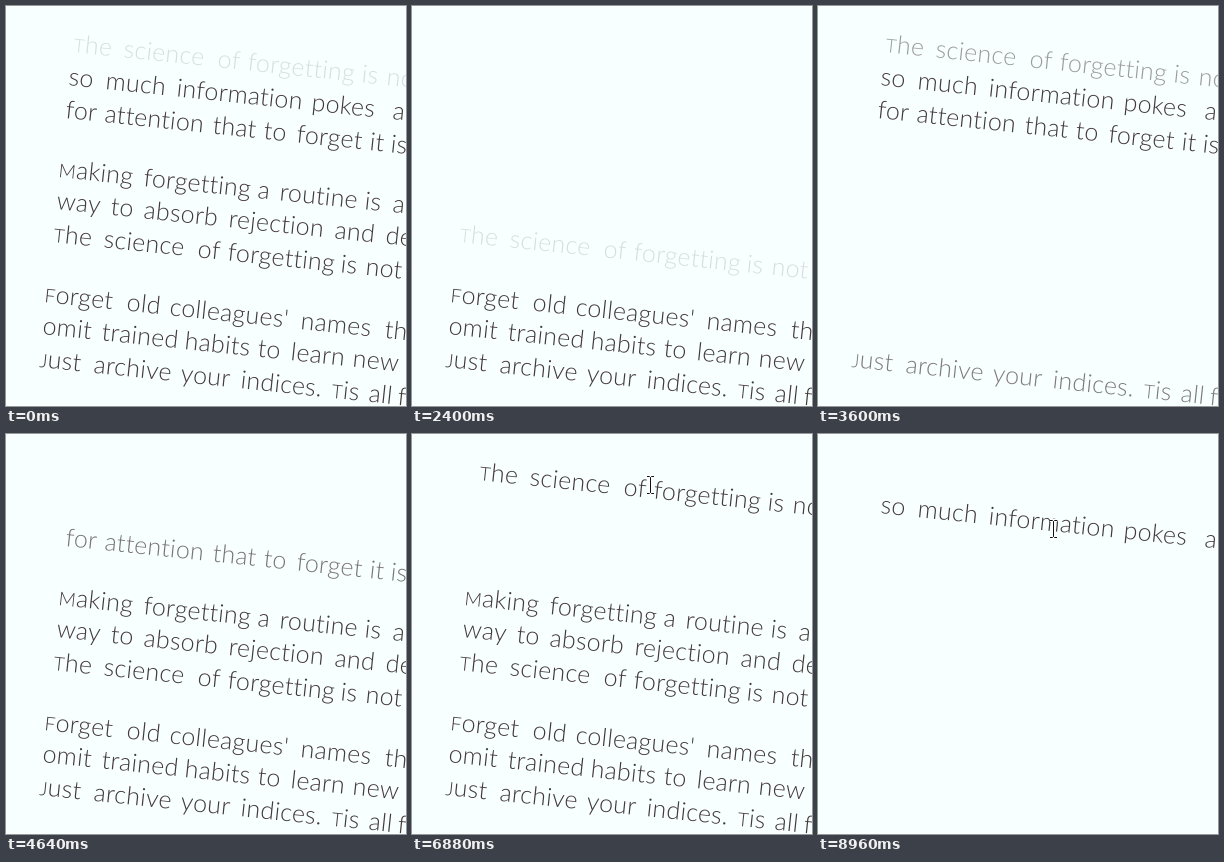
Recreate the animation shown at these times as an HTML page. Size 400 by 400 pixels, loop 9440 ms.

```html
<!DOCTYPE html>
<html lang="en">
<head>
<meta charset="utf-8">
<title>Forgetting</title>
<style>
  html, body { margin: 0; width: 100%; height: 100%; overflow: hidden; background: #f8ffff; }
  svg { display: block; width: 100%; height: 100%; }
  text {
    font: 300 25px Lato, sans-serif; letter-spacing: .25px;
    font-variant-ligatures: none; fill: #43383a;
  }
  .cap { font-size: 19px; }
  #caret path { fill: none; stroke: #fff; stroke-width: 3; }
  #caret path + path { stroke: #111; stroke-width: 1; }
</style>
</head>
<body>
<svg viewBox="0 0 400 400">
  <g id="page"></g>
  <g id="caret"></g>
</svg>
<script>
const LOOP = 9440, STEP = 40, TILT = 6;

// baseline of the first word, then each word after its left edge
const LINES = [
  "46 67 The 117 science 211 of 241 forgetting 355 is 380 not",
  "79 62 so 99 much 170 information 305 pokes 386 a",
  "112 59 for 98 attention 206 that 257 to 290 forget 363 it 384 is",
  "171 52 Making 137 forgetting 251 a 273 routine 358 is 386 a",
  "203 50 way 104 to 137 absorb 222 rejection 328 and 379 defeat",
  "236 47 The 97 science 191 of 221 forgetting 334 is 359 not",
  "296 38 Forget 120 old 163 colleagues' 294 names 378 that",
  "328 36 omit 95 trained 178 habits 251 to 284 learn 346 new",
  "361 33 Just 87 archive 174 your 234 indices. 325 Tis 362 all 391 for"
];
const RETURN = [2960, 3720, 4240];
const LAST_FADE = [6880, 7360, 7900, 8400, 8500, 8600];

const page = document.getElementById("page");
const caret = document.getElementById("caret");

const stretch = 1 / Math.cos(TILT * Math.PI / 180);
page.innerHTML = LINES.map(line => {
  const [y, ...parts] = line.split(" ");
  const x0 = parts[0];
  let words = "";
  for (let i = 0; i < parts.length; i += 2) {
    const x = ((parts[i] - x0) * stretch).toFixed(1);
    const word = parts[i + 1].replace(/[A-Z]/, '<tspan class="cap">$&</tspan>');
    words += `<tspan x="${x}">${word}</tspan>`;
  }
  return `<text transform="translate(${x0} ${y}) rotate(${TILT})">${words}</text>`;
}).join("");

const beam = '<path d="M-3.5-8.5h2.5l1 1l1-1h2.5M0-7.5v15M-3.5 8.5h2.5l1-1l1 1h2.5"/>';
caret.innerHTML = beam + beam;

// each fade: start, duration, final opacity
function fadesFor(i) {
  const fades = [[480 * i - 400, 480, 0], [RETURN[Math.floor(i / 3)], 280, 1]];
  if (i < 3) fades.push([3340 + 570 * i, 520, 0]);
  else fades.push([LAST_FADE[i - 3], i < 6 ? 520 : 360, 0]);
  if (i === 0) fades.push([5960, 160, 1], [6920, 440, 0]);
  if (i === 1) fades.push([7080, 160, 1]);
  return fades;
}

const rows = [...page.children].map((el, i) => ({ el, fades: fadesFor(i) }));
const progress = (t, start, span) => Math.min(1, Math.max(0, (t - start) / span));

function draw(now) {
  const t = Math.floor((now - begin) % LOOP / STEP) * STEP;
  for (const { el, fades } of rows) {
    let alpha = 1;
    for (const [start, span, goal] of fades) {
      alpha += (goal - alpha) * progress(t, start, span);
    }
    el.setAttribute("opacity", alpha);
  }
  const p = progress(t, 6920, 320);
  const k = p * p * (3 - 2 * p);
  const x = Math.round(238 - 3 * k) + 0.5;
  const y = Math.round(51 + 44 * k);
  caret.setAttribute("transform", `translate(${x} ${y})`);
  caret.setAttribute("visibility", t >= 6000 ? "visible" : "hidden");
}

const begin = performance.now();
function tick() {
  draw(performance.now());
  requestAnimationFrame(tick);
}
tick();
</script>
</body>
</html>
```
